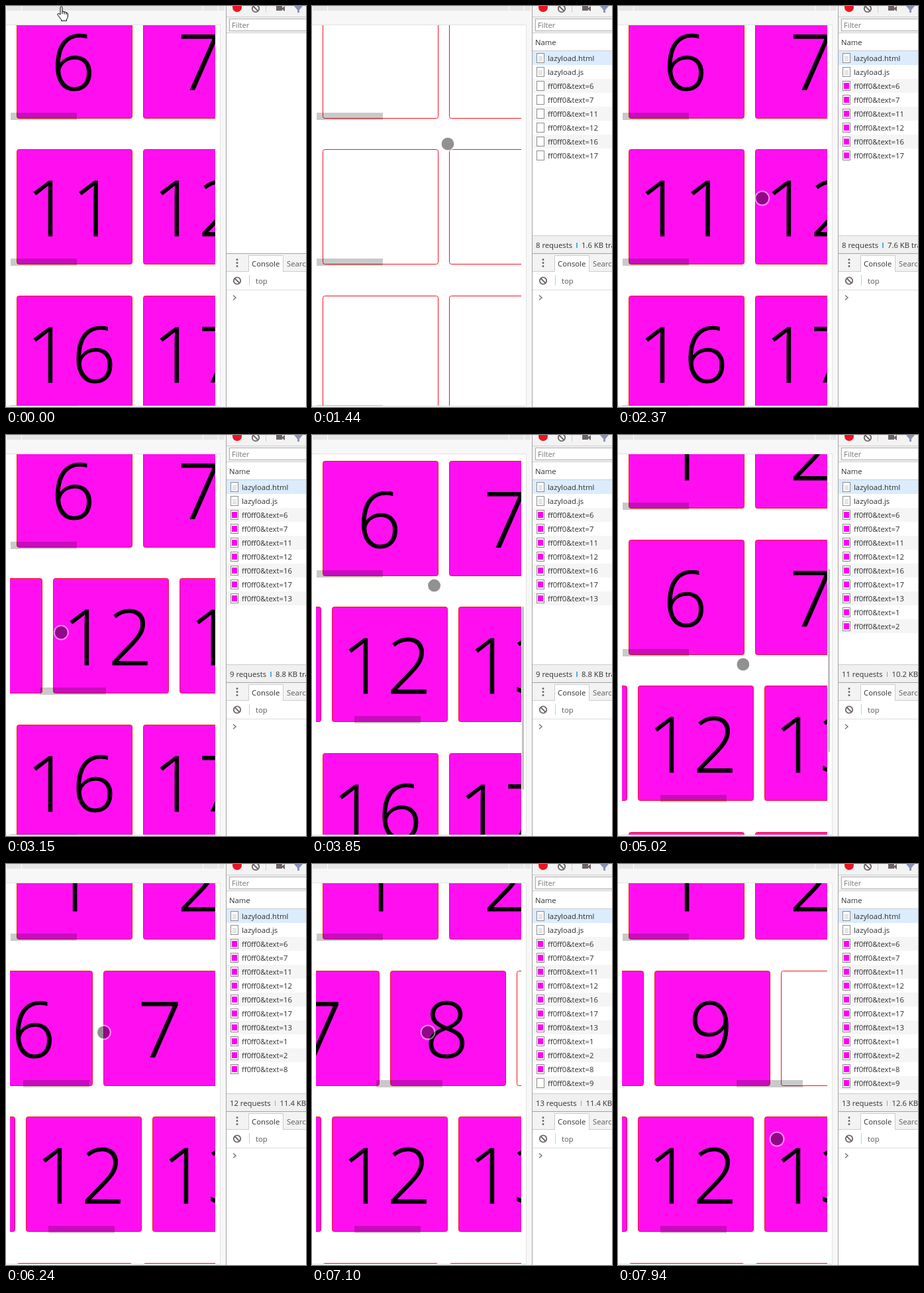
Write an HTML page that moves like this. It is 453 px wide and 605 px high and loops after 8 s.

```html
<!DOCTYPE html>
<html lang="en">
<head>
<meta charset="utf-8">
<title>Lazy loading</title>
<style>
html, body { margin: 0; width: 100%; height: 100%; overflow: hidden; background: #fff; }
svg { display: block; width: 100vw; height: 100vh; }
text { font: 11.3px "Open Sans", "Noto Sans", sans-serif; fill: #303030; white-space: pre; }
.digit { font-size: 117px; font-weight: 300; letter-spacing: 2px; fill: #000; stroke: #000; text-anchor: middle; }
</style>
</head>
<body>
<svg viewBox="0 0 453 605">
  <defs>
    <clipPath id="view"><rect x="6" y="29" width="310" height="574"/></clipPath>
  </defs>
  <rect width="453" height="605" fill="#fff"/>

  <!-- device area -->
  <rect width="332" height="605" fill="#f7f7f7"/>
  <rect width="330" height="7" fill="#e5e5e5"/>
  <path d="M.5 0V7M23.5 0V7M297.5 0V7M320.5 0V7" stroke="#fff"/>
  <rect y="29" width="323" height="574" fill="#fff"/>
  <path d="M0 28.5H323.5V603.5H0" fill="none" stroke="#e2e2e2"/>
  <g id="cards" clip-path="url(#view)"></g>
  <rect id="vbar" x="317" width="3" height="276" fill="#c1c1c1"/>

  <!-- tools panel -->
  <rect x="333" width="120" height="41" fill="#f3f3f3"/>
  <circle cx="349" cy="2" r="7" fill="#ec1422"/>
  <g id="block" fill="none" stroke="#6e6468" stroke-width="1.8" transform="translate(377 4)">
    <circle r="5.2"/><path d="M-3.5 -3.5L3.5 3.5"/>
  </g>
  <path d="M392.5 0V10" stroke="#ccc"/>
  <path d="M408 0H417V3L421 0V8L417 5V7H408Z" fill="#6e6468"/>
  <path d="M435 0H448L443 6V10H440V6Z" fill="#8a93b5"/>
  <path d="M333 16.5H453M333 40.5H453" stroke="#ccc"/>
  <rect x="337.5" y="19.5" width="130" height="18" fill="#fff" stroke="#a9a9a9"/>
  <text x="341" y="33" style="fill:#757575">Filter</text>

  <g id="network">
    <text x="337" y="59">Name</text>
    <path d="M333 67.5H453" stroke="#ccc"/>
    <g id="list"></g>
    <rect x="333" y="347" width="120" height="26" fill="#f0f0f0"/>
    <path d="M333 346.5H453" stroke="#ccc"/>
    <text id="count" x="338" y="365"></text>
    <path id="split" d="M0 357V365"/>
    <text id="size" y="365"></text>
  </g>

  <rect x="333" y="374" width="120" height="27" fill="#f3f3f3"/>
  <path d="M333 373.5H453" stroke="#a3a3a3"/>
  <path d="M333 400.5H453" stroke="#ccc"/>
  <path d="M366.5 401V376.5H418.5V401" fill="#fff" stroke="#ccc"/>
  <path d="M349 382.5V393" stroke="#6e6468" stroke-width="3" stroke-linecap="round" stroke-dasharray="0 5"/>
  <text x="371" y="393">Console</text>
  <text x="424" y="393" style="fill:#5a5a5a">Search</text>
  <path d="M333 428.5H453" stroke="#ddd"/>
  <use href="#block" x="-28" y="410.5"/>
  <path d="M367.5 406V422" stroke="#b5d3dd"/>
  <text x="377" y="419" style="fill:#5a5a5a">top</text>
  <path d="M343 436.5L347 440L343 443.5" fill="none" stroke="#777" stroke-width="1.5"/>
  <path d="M332.5 0V605" stroke="#a3a3a3"/>

  <g id="touch">
    <circle r="9.5" fill="#000" fill-opacity=".43"/>
    <circle r="10.5" fill="none" stroke="#fff" stroke-opacity=".5" stroke-width="2"/>
  </g>
  <path id="hand" d="M5 13V2.5Q5 .8 6.5 .8T8 2.5V8.5Q10.500 7.500 11 9Q13.500 8.300 14 10Q16.300 9.600 16.300 12V16Q16 18.500 14.500 20V22.300H6.500V20.500L1 13.500Q.5 11.500 2.300 11.300Q4 11.700 5 13ZM8 8.500V12M11 9V12.500M14 10V13" fill="#fff" stroke="#000"/>
</svg>
<script>
const LOOP = 8000, RELOAD = 740, PITCH = 191, ROW = 220.5;
const $ = id => document.getElementById(id);

function add(parent, tag, attrs, text) {
  const el = document.createElementNS("http://www.w3.org/2000/svg", tag);
  for (const k in attrs) el.setAttribute(k, attrs[k]);
  if (text !== undefined) el.textContent = text;
  parent.appendChild(el);
  return el;
}
const show = (el, on) => el.setAttribute("display", on ? "inline" : "none");
const move = (el, x, y) => el.setAttribute("transform", `translate(${x} ${y})`);

const linear = p => p;
const easeIn = p => p * p;
const easeOut = p => 1 - (1 - p) ** 2;
const smooth = p => p * p * (3 - 2 * p);
const slowing = p => 1 - (1 - p) ** 1.2;
const part = (t, start, end) => Math.min(1, Math.max(0, (t - start) / (end - start)));
const mix = (a, b, p) => a.map((v, i) => v + (b[i] - v) * p);

// touch movements; those with a target scroll it, then coast a little further
const gestures = [
  { start: 1180, end: 1430, from: [196, 0], to: [205, 208], ease: linear },
  { start: 2560, end: 3314, from: [219, 298], to: [42, 298], ease: linear, target: 2 },
  { start: 3490, end: 5076, from: [183, 184], to: [189, 349], ease: slowing, target: "page" },
  { start: 5850, end: 6550, from: [207, 254], to: [22, 254], ease: easeIn, target: 1, coast: 45 },
  { start: 7000, end: 7350, from: [225, 254], to: [50, 254], ease: linear, target: 1, coast: 129 },
  { start: 7770, end: 7940, from: [227, 305], to: [240, 415], ease: linear }
];
const progress = (g, t) => g.ease(part(t, g.start, g.end));

function touchAt(t) {
  const i = Math.max(0, gestures.findLastIndex(g => t >= g.start));
  const g = gestures[i], next = gestures[i + 1];
  if (t < g.end || !next) return mix(g.from, g.to, progress(g, t));
  return mix(g.to, next.from, smooth(part(t, g.end, next.start)));
}

function scrollOf(target, t) {
  const axis = target === "page" ? 1 : 0;
  return gestures.filter(g => g.target === target).reduce((sum, g) =>
    sum + Math.abs(g.to[axis] - g.from[axis]) * progress(g, t) +
    (g.coast || 0) * easeOut(part(t, g.end, g.end + 300)), 0);
}

// image requests: time listed, delay until loaded, kilobytes each
const batches = [
  { listed: 1000, wait: 640, kb: 1, cards: [6, 7, 11, 12, 16, 17] },
  { listed: 2900, wait: 130, kb: 1.2, cards: [13] },
  { listed: 4060, wait: 80, kb: .7, cards: [1, 2] },
  { listed: 5920, wait: 160, kb: 1.2, cards: [8] },
  { listed: 6980, wait: 160, kb: 1.2, cards: [9] }
];
const images = batches.flatMap(b => b.cards.map((n, i) => ({
  n, name: "ff0ff0&text=" + n, listed: b.listed, loaded: b.listed + b.wait + i * 80, kb: b.kb
})));
const entries = [
  { name: "lazyload.html", listed: 820 }, { name: "lazyload.js", listed: 910 }, ...images
];

// the screen refreshes in discrete steps: [start, step]
const rates = [[0, 1], [RELOAD, 87.5], [1570, 78.4], [5070, 200], [5240, 77.5]];
function snap(t) {
  const [start, step] = rates.findLast(r => r[0] <= t);
  return start + Math.floor((t - start + 20) / step) * step;
}

const rows = [0, 1, 2, 3].map(r => {
  const group = add($("cards"), "g", {});
  const strip = add(group, "g", {});
  const cards = [1, 2, 3, 4, 5].map(c => {
    const n = r * 5 + c;
    const g = add(strip, "g", { transform: `translate(${16.5 + (c - 1) * PITCH} .5)` });
    const box = add(g, "rect", { width: 174, height: 173, rx: 3, stroke: "#f01420" });
    const label = add(g, "text", { class: "digit", x: n < 10 ? 86 : 83, y: 130 }, n);
    return { box, label, image: images.find(m => m.n === n) };
  });
  const bar = add(group, "rect", { y: 165, width: 100, height: 11, fill: "#000", "fill-opacity": .21 });
  return { group, strip, cards, bar };
});

entries.forEach((e, i) => {
  e.g = add($("list"), "g", { transform: `translate(333 ${68 + i * 21})` });
  add(e.g, "rect", { width: 120, height: 21, fill: i ? (i % 2 ? "#fff" : "#f5f5f5") : "#dbecfd" });
  add(e.g, "rect", { x: 6.5, y: 3.5, width: 11, height: 14, fill: "#fff", stroke: "#8c8c8c" });
  if (e.loaded) e.thumb = add(e.g, "rect", { x: 8, y: 6, width: 8, height: 9, fill: "#f0e" });
  else add(e.g, "path", { d: "M9 8.5H15M9 10.5H15M9 12.5H15M9 14.5H15", stroke: "#ccc" });
  add(e.g, "text", { x: 23, y: 14.5 }, e.name);
});

const isLoaded = (m, t) => m && (t >= m.loaded || (t < RELOAD && m.listed === batches[0].listed));

function drawPage(t) {
  const offset = scrollOf("page", t);
  show($("cards"), t < RELOAD || t >= 820);
  rows.forEach((row, r) => {
    const scroll = scrollOf(r, t);
    move(row.group, 0, Math.round(-225 + r * ROW) + Math.round(offset));
    move(row.strip, -Math.round(scroll), 0);
    row.bar.setAttribute("x", 7 + Math.round(scroll * .322));
    for (const { image, box, label } of row.cards) {
      const on = isLoaded(image, t);
      box.setAttribute("fill", on ? "#ff0ff0" : "#fff");
      show(label, on);
    }
  });
  $("vbar").setAttribute("y", Math.round(279.5 - offset * .478));
  show($("vbar"), offset > 0 && t < 5300);
}

function drawNetwork(t) {
  const count = entries.filter(e => t >= e.listed).length;
  const kb = images.reduce((sum, m) => sum + (t >= m.loaded ? m.kb : 0), 1.6);
  const wide = count > 9;
  const x = wide ? 406.5 : 400;
  show($("network"), count > 0);
  for (const e of entries) {
    show(e.g, t >= e.listed);
    if (e.thumb) show(e.thumb, t >= e.loaded);
  }
  $("count").textContent = count + (count === 1 ? " request" : " requests");
  move($("split"), x, 0);
  $("split").setAttribute("stroke", wide ? "#a0a0a0" : "#4db0e6");
  $("split").setAttribute("stroke-width", wide ? 1 : 2);
  $("size").setAttribute("x", x + 7);
  $("size").textContent = kb.toFixed(1) + " KB transferred";
}

function draw(time) {
  const t = snap(time);
  drawPage(t);
  drawNetwork(t);
  show($("touch"), t >= gestures[0].start);
  move($("touch"), ...touchAt(t));
  const hop = Math.floor((time + 25) / 95);
  show($("hand"), hop < 3);
  move($("hand"), 77 + hop * 55, -6 * hop);
}

const begin = performance.now();
function tick() {
  draw((performance.now() - begin) % LOOP);
  requestAnimationFrame(tick);
}
tick();
</script>
</body>
</html>
```
